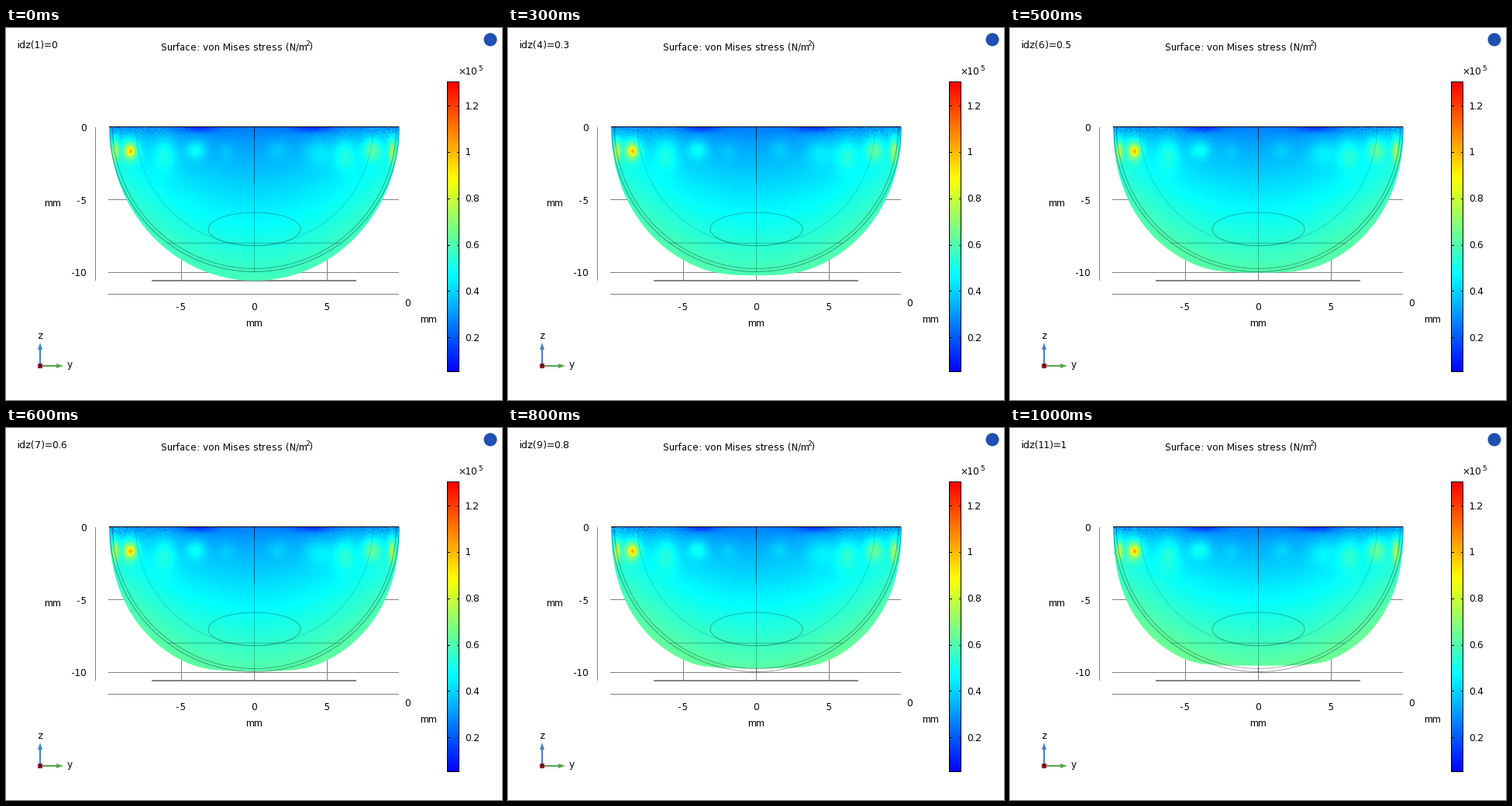
These frames come from a looping animation (640 px wide and 480 px high, 1.1 s). A matplotlib script:

```python
import numpy as np
import matplotlib.pyplot as plt
from matplotlib.animation import FuncAnimation
from matplotlib.colors import LinearSegmentedColormap
from matplotlib.patches import Circle, Ellipse, Polygon, Rectangle

W, H, DPI = 640, 480, 80
PT = 72 / DPI              # points per pixel
FRAMES, INTERVAL = 11, 100
CX, TOP = 320.5, 128       # middle of the flat upper face
HALF, DEPTH = 187, 198     # body half width and undeformed depth
X0, X1, Y1 = 132, 509, 328

plt.rcParams["font.family"] = "DejaVu Sans"
plt.rcParams["text.hinting_factor"] = 1    # whole-pixel letter spacing
RAINBOW = LinearSegmentedColormap.from_list(
    "rainbow_stress", [(0, 0, 1), (0, 1, 1), (1, 1, 0), (1, 0, 0)])

fig = plt.figure(figsize=(W / DPI, H / DPI), dpi=DPI, facecolor="white")
ax = fig.add_axes([0, 0, 1, 1])


def text(x, y, s, size=12, ha="left", **kw):
    return ax.text(x, y, s, fontsize=size * PT, ha=ha, va="baseline", **kw)


def line(xs, ys, color="#808080", lw=1.0, **kw):
    ax.plot(xs, ys, color=color, lw=lw * PT, solid_capstyle="butt",
            dash_capstyle="butt", snap=False, **kw)


def arc(radius, **kw):
    a = np.linspace(0, np.pi, 200)
    line(CX + radius * np.cos(a), TOP - .5 + radius * np.sin(a), "black", **kw)


# Pixel grid over the body
px, py = np.meshgrid(np.arange(X0, X1) + 0.5, np.arange(TOP, Y1) + 0.5)
dx, dy = px - CX, py - TOP
side, depth = (dx / HALF) ** 2, dy / DEPTH

# Local highs and lows: x, y, width, height, strength
SPOTS = [
    (161, 159, 4, 5, .2), (160, 158, 10, 13, .27), (141, 158, 4, 14, .23),
    (205, 162, 14, 22, .09), (245, 157, 13, 12, .1), (285, 158, 10, 12, .03),
    (350, 156, 12, 12, .04), (437, 163, 14, 20, .1), (403, 160, 18, 16, .06),
    (472, 157, 12, 15, .15), (498, 158, 5, 16, .2),
    (250, 128, 22, 6, -.1), (395, 128, 26, 6, -.1),
]


def base_field():
    u = .185 + .24 * depth + .13 * side
    u -= (.03 + .1 * side) * np.exp(-dy / 12)
    for x, y, sx, sy, amp in SPOTS:
        u += amp * np.exp(-((px - x) / sx) ** 2 - ((py - y) / sy) ** 2)
    return u


BASE = base_field()
GRAIN = .005 + .05 * np.exp(-dy / 9) * np.clip(side, 0, 1)


def profile(t):
    """Depth of the lower edge per column; it bulges and flattens with t."""
    n, k = 2 + .35 * t, 4.0
    col = np.abs(dx[0]) / HALF
    bowl = (DEPTH - 10 * t) * np.clip(1 - col ** n, 0, 1) ** (1 / n)
    press = np.exp(-(DEPTH - 19 * t) / k) - np.exp(-DEPTH / k)
    edge = -k * np.log(np.exp(-bowl / k) + press)
    return np.where(col < 1, edge, -1)


def body(i):
    t = i / (FRAMES - 1)
    rng = np.random.default_rng(i)
    u = BASE + t * (.01 + .05 * depth) + GRAIN * rng.normal(size=BASE.shape)
    rgba = RAINBOW(np.clip(u, 0, 1))
    edge = profile(t)
    slope = np.hypot(1, np.gradient(edge))
    rgba[..., 3] = np.clip((edge - dy) / slope + .5, 0, 1)
    return rgba


# Grid behind the body
line([115.5] * 2, [128, 326])
line([132, 507], [343.5] * 2)
for y in (221.5, 315.5):
    line([132, 507], [y] * 2)
for x in (226.5, 320.5, 414.5):
    line([x] * 2, [222, 326])
line([188, 452], [326] * 2, "#404040", 1.3)

solid = ax.imshow(body(0), extent=(X0, X1, Y1, TOP), interpolation="nearest",
                  aspect="auto", zorder=3)

# Geometry edges over the body
over = dict(zorder=4)
arc(187, lw=.8, alpha=.45, **over)
arc(183, lw=.8, alpha=.4, **over)
arc(153, lw=.8, alpha=.3, ls=(0, (2, 1.5)), **over)
ax.add_patch(Ellipse((CX, 259.5), 119, 43, fill=False, ec="black",
                     lw=.8 * PT, alpha=.35, zorder=4))
line([208, 432], [277.5] * 2, "black", .8, alpha=.35, **over)
line([320.5] * 2, [128, 315], "black", alpha=.25, **over)
line([320.5] * 2, [128, 200], "black", alpha=.3, **over)
line([320.5] * 2, [128, 143], "black", alpha=.5, **over)
line([133, 507], [127.5] * 2, "black", **over)

# Axis labels
for y, s in ((133, "0"), (227, "-5"), (320, "-10")):
    text(104, y, s, ha="right")
for x, s in ((226, "-5"), (320, "0"), (414, "5")):
    text(x, 364, s, ha="center")
text(49, 230, "mm")
text(320, 385, "mm", ha="center")
text(514, 359, "0")
text(534, 380, "mm")

# Title
label = text(14, 26, "")
text(200, 28, "Surface: von Mises stress (N/m")
text(386, 23, "2", 9)
text(391, 28, ")")

# Colour bar
ax.imshow(np.linspace(1, 0, 375)[:, None], extent=(569, 585, 444, 69),
          cmap=RAINBOW, aspect="auto", interpolation="nearest")
ax.add_patch(Rectangle((569.5, 69.5), 15, 374, fill=False, ec="black",
                       lw=PT, snap=False, zorder=4))
for j in range(1, 7):
    y = 459 - 59.8 * j
    for x in (570, 582):
        line([x, x + 3], [round(y) + .5] * 2, "black", **over)
    text(592, y + 4.5, f"{j / 5:g}")
text(583, 60, "×10")
text(609, 55, "5", 9)

# Orientation triad
BLUE, GREEN = "#4682be", "#55a64b"
line([44] * 2, [436, 414], BLUE, 2)
ax.add_patch(Polygon([(44, 406), (41, 415), (47, 415)], color=BLUE, lw=0))
line([44, 66], [436] * 2, GREEN, 2)
ax.add_patch(Polygon([(74, 436), (65, 433), (65, 439)], color=GREEN, lw=0))
ax.add_patch(Circle((44, 436), 3.3, color="#c8143c", lw=0, zorder=4))
text(44, 401, "z", ha="center")
text(79, 438, "y")
text(44, 439, "x", 11, ha="center", zorder=5)

# Corner badge
ax.add_patch(Circle((625, 15), 8.5, color="#1e50b4", lw=0))

ax.set_xlim(0, W)
ax.set_ylim(H, 0)
ax.axis("off")


def update(i):
    solid.set_data(body(i))
    label.set_text(f"idz({i + 1})={i / (FRAMES - 1):g}")
    return solid, label


anim = FuncAnimation(fig, update, frames=FRAMES, interval=INTERVAL,
                     repeat=True, repeat_delay=0, blit=False)
plt.show()
```
